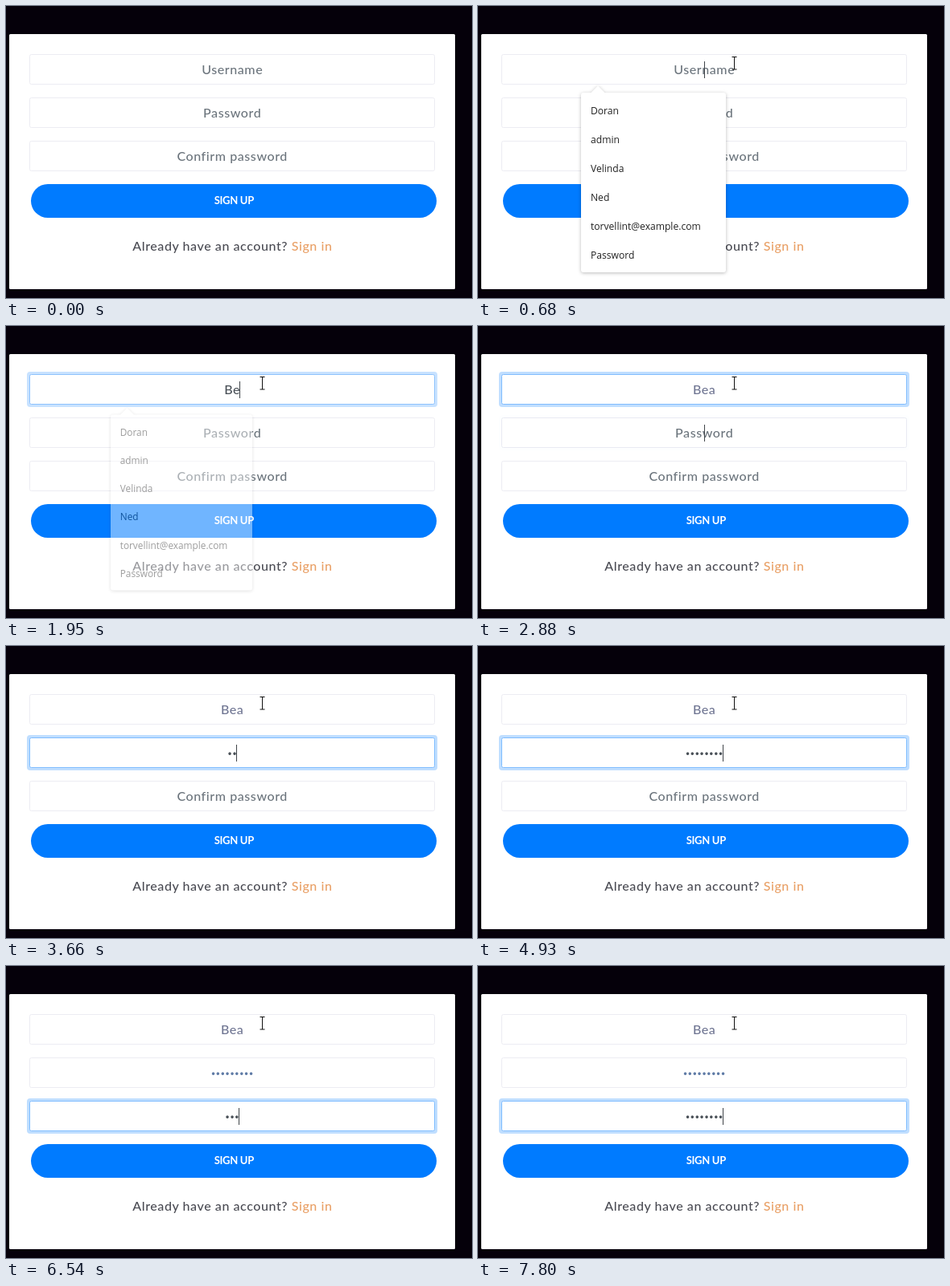
An HTML page that plays this animation: 579 by 364 pixels, repeating every 8 s.

```html
<!DOCTYPE html>
<html lang="en">
<head>
<meta charset="utf-8">
<title>Sign up form</title>
<style>
  html, body { margin: 0; width: 100%; height: 100%; overflow: hidden; background: #05000a; }
  svg { display: block; width: 579px; height: 364px; }
  text { white-space: pre; }
  .form text { font: 500 16px Lato, sans-serif; letter-spacing: .58px; }
  .mid { text-anchor: middle; }
  .value { fill: #6c757d; }
  .value.typed { fill: #495057; }
  .value.left { fill: #6f7592; }
  .form .value.dots { font: 12px "DejaVu Sans", sans-serif; letter-spacing: -1.21px; }
  .value.dots.left { fill: #5f7ba6; }
  .form .send { font: 700 13px Lato, sans-serif; letter-spacing: -.3px; fill: #fff; }
  .ask { fill: #4a4b53; }
  .ask tspan { fill: #e9a066; }
  .menu text { font: 12.1px "Open Sans", sans-serif; fill: #222; }
  .menu path { filter: drop-shadow(0 1px 2px rgba(0, 0, 0, .27)); }
</style>
</head>
<body>
<svg viewBox="0 0 579 364">
  <rect x="4" y="35" width="554" height="318" rx="1.5" fill="#fff"/>
  <g class="form">
    <g id="fields"></g>
    <rect id="button" x="31" y="222" width="504" height="42" rx="21"/>
    <text class="send mid" x="283.3" y="247">SIGN UP</text>
    <text class="ask mid" x="281.4" y="305">Already have an account? <tspan>Sign in</tspan></text>
  </g>
  <rect id="caret" width="1" height="21" fill="#40454a"/>
  <g id="menu" class="menu">
    <path d="M131 108H140.500L149 99.500L157.500 108H305a3 3 0 0 1 3 3V329a3 3 0 0 1 -3 3H131a3 3 0 0 1 -3 -3V111a3 3 0 0 1 3 -3Z" fill="#fff"/>
  </g>
  <g id="mouse">
    <path id="beam" d="M-3 -7.500H3M0 -7.500V8M-3 8H3" transform="translate(.5 0)" fill="none" stroke="#111"/>
    <path id="hand" d="M-2 3V-8q1.500 -2 3 0V-3L7 -2q2 .5 2 3V5L7 10H-2L-7 3q0 -3 3 -1Z" fill="#fff" stroke="#111"/>
  </g>
</svg>
<script>
const LOOP = 8000, MID = 281, ROW = 54, PITCH = 5.87, BLINK = 530;
const MENU_IN = 420, MENU_OUT = 1880, FADE = 210;
const $ = id => document.getElementById(id);
const ramp = (t, from, span) => Math.min(1, Math.max(0, (t - from) / span));
const easeOut = (p, power) => 1 - (1 - p) ** power;

function set(el, attrs) {
  for (const key in attrs) el.setAttribute(key, attrs[key]);
}

function add(parent, tag, attrs, content = '') {
  const el = document.createElementNS('http://www.w3.org/2000/svg', tag);
  set(el, attrs);
  el.textContent = content;
  return parent.appendChild(el);
}

// key(i) is the time of the i-th keystroke.
const fields = [
  { hint: 'Username', word: 'Bea', focus: 290, glowAt: MENU_OUT, key: i => i < 2 ? MENU_OUT : 2750 },
  // steady typing, slower for the last two
  { hint: 'Password', word: '•'.repeat(9), focus: 2880, key: i => 3460 + 200 * Math.max(1, i) + 70 * Math.max(0, i - 6) },
  // bursts of three that slow down
  { hint: 'Confirm password', word: '•'.repeat(8), focus: 5470, key: i => {
    const burst = Math.floor(i / 3), k = i % 3;
    return 6270 + 665 * burst + (k && 200 * k - 130 + 65 * burst);
  } }
];

fields.forEach((f, i) => {
  const g = add($('fields'), 'g', { transform: `translate(0 ${i * ROW})` });
  const box = { x: 29.5, y: 60.5, width: 503, height: 37, rx: 2, fill: '#fff' };
  add(g, 'rect', { ...box, stroke: '#ececf3' });
  f.glow = add(g, 'g', {});
  add(f.glow, 'rect', { x: 26, y: 57, width: 510, height: 44, rx: 4, fill: '#bfdeff' });
  add(f.glow, 'rect', { ...box, stroke: '#80bdff' });
  f.text = add(g, 'text', {});
  f.keys = [...f.word].map((_, n) => f.key(n));
  f.blur = fields[i + 1]?.focus ?? LOOP;
});

['Doran', 'admin', 'Velinda', 'Ned', 'torvellint@example.com', 'Password']
  .forEach((name, i) => add($('menu'), 'text', { x: 140, y: 135 + i * 36 }, name));

function drawField(f, t) {
  const value = f.word.slice(0, f.keys.filter(k => k <= t).length);
  const dots = value.startsWith('•');
  const state = !value ? '' : t < f.blur ? 'typed' : 'left';
  f.text.textContent = value || f.hint;
  set(f.text, { class: `value mid ${state} ${dots ? 'dots' : ''}`, x: MID + (dots ? -.6 : .2), y: dots ? 84.5 : 85 });
  const glow = time => easeOut(ramp(t, time, 150), 3);
  set(f.glow, { opacity: glow(f.glowAt ?? f.focus) - glow(f.blur) });
}

// The caret blinks anew after each focus or keystroke.
function drawCaret(t) {
  const row = fields.findLastIndex(f => f.focus <= t);
  if (row < 0) return set($('caret'), { visibility: 'hidden' });
  const { focus, keys, word } = fields[row];
  const count = keys.filter(k => k <= t).length;
  const since = t - (count ? keys[count - 1] : focus);
  const advance = word[0] === '•' ? PITCH : 9.6;
  set($('caret'), {
    x: Math.floor(MID + count * advance / 2),
    y: 69 + row * ROW,
    visibility: Math.floor(since / BLINK) % 2 ? 'hidden' : 'visible'
  });
}

function drawMenu(t) {
  const alpha = (ramp(t, MENU_IN, FADE) - ramp(t, MENU_OUT, FADE)) ** 2;
  const scale = .96 + .04 * alpha;
  set($('menu'), { opacity: alpha, transform: `translate(218 220) scale(${scale}) translate(-218 -220)` });
}

// The pointer swings up from the lower right, crossing the button.
function drawMouse(t) {
  const p = ramp(t, 70, 350);
  const x = 428 - 110 * easeOut(p, 2), y = 322 - 251 * p;
  const beam = y < 216;
  set($('mouse'), { transform: `translate(${x} ${y})`, opacity: t < 70 ? 0 : 1 });
  set($('beam'), { opacity: beam ? 1 : 0 });
  set($('hand'), { opacity: beam ? 0 : 1 });
  set($('button'), { fill: y > 222 && y < 264 ? '#0069d9' : '#007bff' });
}

function draw(t) {
  fields.forEach(f => drawField(f, t));
  drawCaret(t);
  drawMenu(t);
  drawMouse(t);
}

const start = performance.now();
function tick() {
  draw((performance.now() - start) % LOOP);
  requestAnimationFrame(tick);
}
tick();
</script>
</body>
</html>
```
